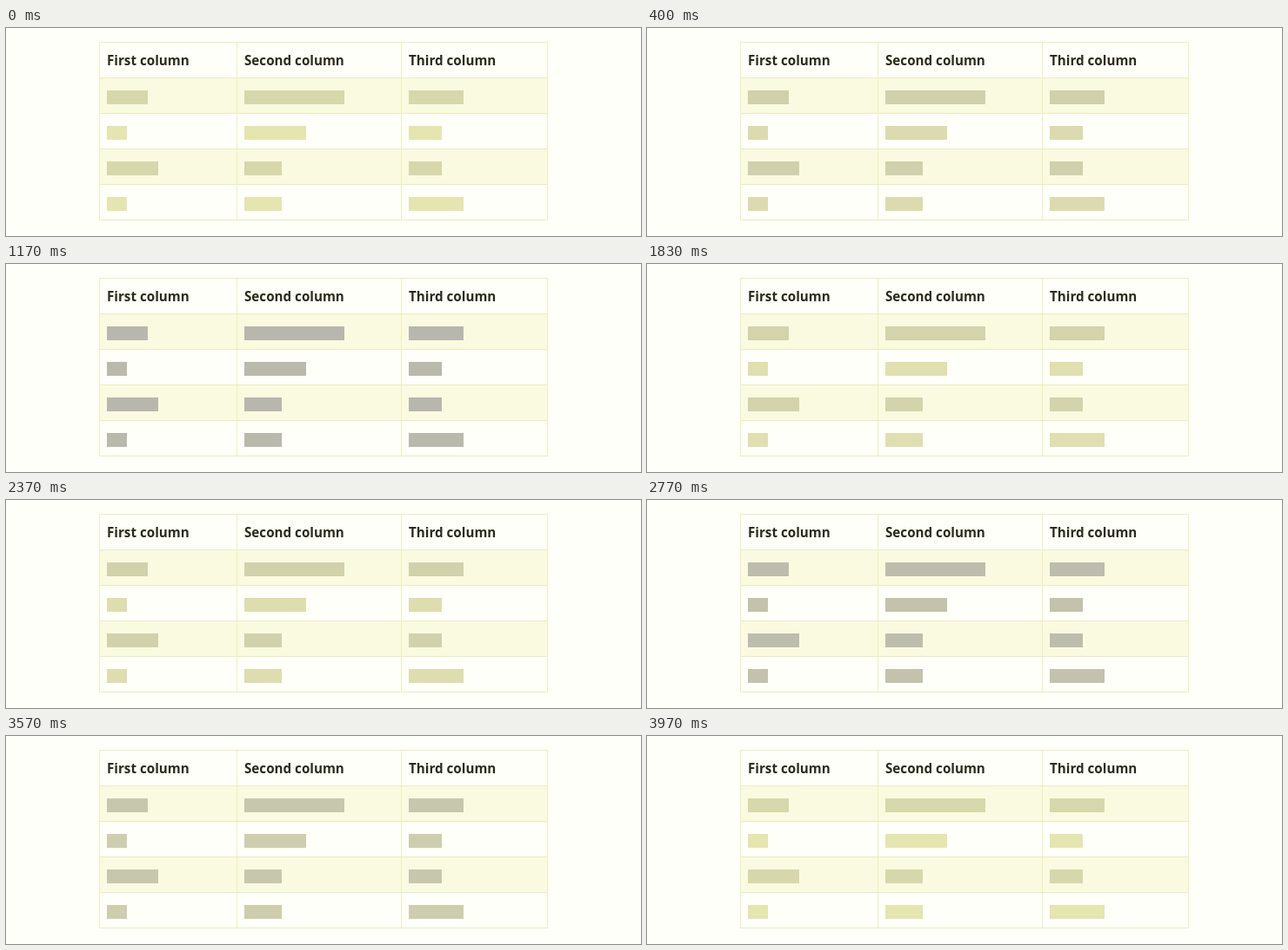
An HTML page that plays this animation: 730x240 px, repeating every 4030 ms.

```html
<!DOCTYPE html>
<html lang="en">
<head>
<meta charset="utf-8">
<title>Table skeleton</title>
<style>
  html, body { margin: 0; width: 100%; height: 100%; overflow: hidden; background: #fffffa; }
  svg { display: block; }
  text { font: 700 15.2px "Open Sans", "Noto Sans", sans-serif; fill: #2b2b1c; }
</style>
</head>
<body>
<svg id="stage" width="730" height="240" viewBox="0 0 730 240" shape-rendering="crispEdges"></svg>
<script>
const LOOP = 4030, PERIOD = 2000, LIGHTEST = 80;
const LEFT = 107, TOP = 16, ROW = 41, RIGHT = 622, BOTTOM = TOP + 5 * ROW;
const columns = [
  { x: 116, title: "First column", bars: [47, 23, 59, 23] },
  { x: 274, title: "Second column", bars: [115, 71, 43, 43] },
  { x: 463, title: "Third column", bars: [63, 38, 38, 63] }
];
// Light and dark ends of the pulse, for shaded and plain rows.
const tones = [
  [[216, 216, 172], [182, 182, 174]],
  [[230, 230, 176], [184, 184, 172]]
];
const stage = document.getElementById("stage");

function add(tag, attrs, parent = stage) {
  const el = document.createElementNS("http://www.w3.org/2000/svg", tag);
  for (const key in attrs) el.setAttribute(key, attrs[key]);
  return parent.appendChild(el);
}
const rect = (x, y, width, height, fill, parent) =>
  add("rect", { x, y, width, height, ...(fill && { fill }) }, parent);

for (const row of [1, 3])
  rect(LEFT, TOP + row * ROW, RIGHT - LEFT + 1, ROW, "#fafae0");
for (let row = 0; row < 6; row++)
  rect(LEFT, TOP + row * ROW, RIGHT - LEFT + 1, 1, "#ebebc2");
for (const x of [LEFT, 265, 454, RIGHT])
  rect(x, TOP, 1, BOTTOM - TOP + 1, "#eeeebc");

const groups = tones.map(() => add("g", {}));
for (const { x, title, bars } of columns) {
  add("text", { x, y: 43 }).textContent = title;
  bars.forEach((width, i) => rect(x, 72 + i * ROW, width, 16, "", groups[i % 2]));
}

function draw(now) {
  const phase = (now % LOOP - LIGHTEST) / PERIOD;
  const dark = (1 - Math.cos(phase * 2 * Math.PI)) / 2;
  groups.forEach((group, i) => {
    const [from, to] = tones[i];
    const rgb = from.map((v, k) => Math.round(v + (to[k] - v) * dark));
    group.setAttribute("fill", `rgb(${rgb})`);
  });
}

const start = performance.now();
function tick() {
  draw(performance.now() - start);
  requestAnimationFrame(tick);
}
tick();
</script>
</body>
</html>
```
